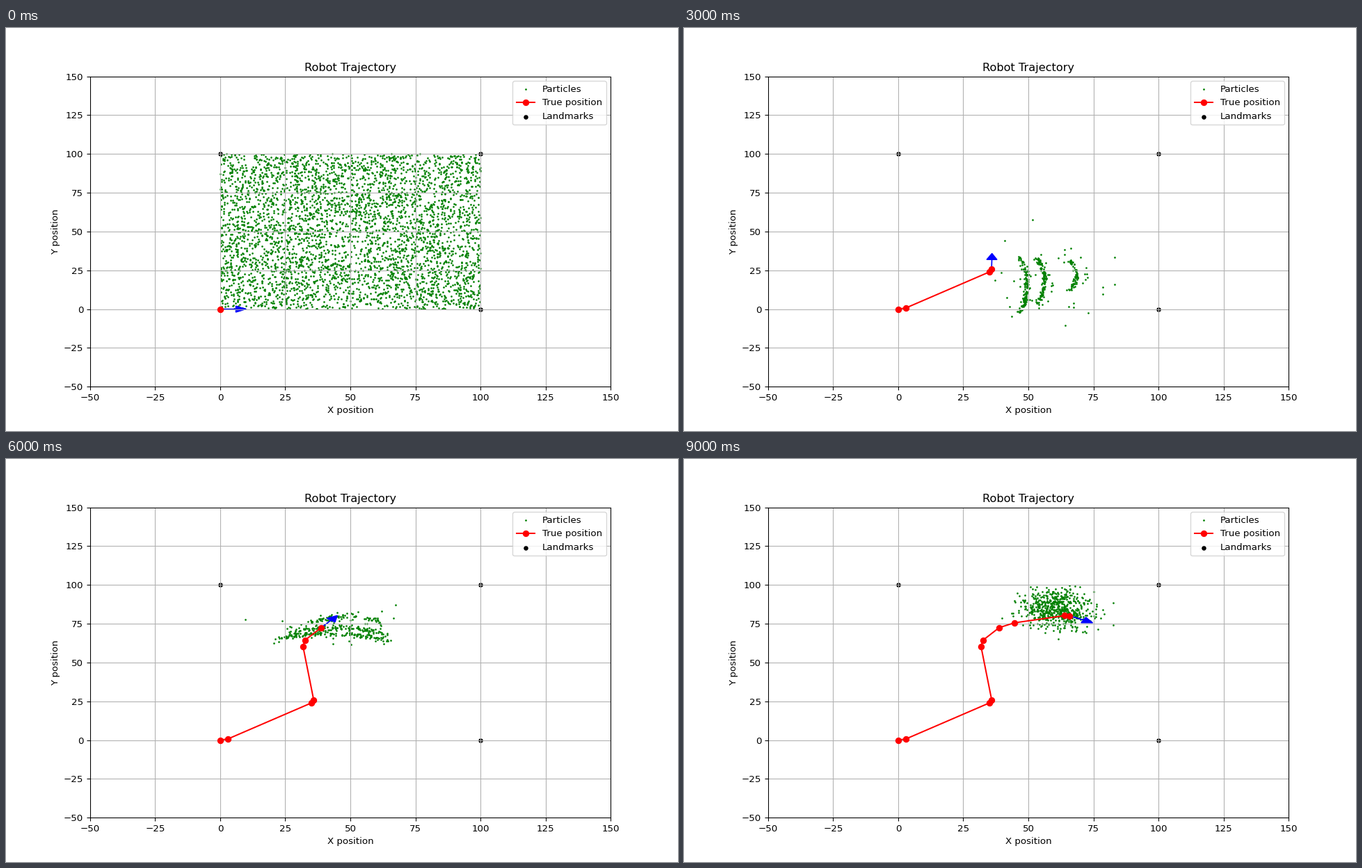
A matplotlib script for the animation above (10000 ms loop, 966 by 580 pixels).

```python
import numpy as np
import matplotlib.pyplot as plt
from matplotlib.animation import FuncAnimation

W, H, DPI = 966, 580, 96.6
rng = np.random.default_rng(7)

# Robot poses and the middle of the particle cloud at each step
PATH = np.array([
    (0, 0), (2.9, 0.7), (35.1, 24.0), (35.9, 25.9), (31.8, 60.4),
    (32.5, 64.3), (38.8, 72.5), (44.7, 75.6), (63.9, 80.2), (65.8, 80.1)])
HEADING = [0, 0.5, 0.78, 1.56, 1.72, 0.93, 0.9, 0.08, 0.4, -0.47]
CENTRE = [(50, 50), (20, 18), (59, 14), (58, 19), (51, 61.5),
          (49, 65), (45.5, 73), (43, 77), (57, 83), (60.5, 84.5)]
LANDMARKS = np.array([(0, 0), (100, 0), (0, 100), (100, 100)])


def fan(centre, half, gap, bend, jitter, upright):
    """Three nested arcs, the inner ones longer and fuller."""
    arcs = []
    for level in (-1, -0.3, 1):
        t = rng.uniform(-1, 1, int(100 - 30 * level))
        along = 3 * level + (half - 4 * level) * t
        out = gap * level + bend * (0.3 - t ** 2)
        arcs.append(np.column_stack((out, along) if upright else (along, out)))
    pts = np.vstack(arcs)
    return centre + pts + rng.normal(0, jitter, pts.shape)


def cloud(step):
    """Particles: uniform, then a blob, then bent ridges, then a blob again."""
    centre = CENTRE[step]
    if step == 0:
        return rng.uniform(0, 100, (4000, 2))
    if step == 1:
        return np.abs(rng.normal(centre, 14, (280, 2)) + 3) - 3
    if step >= 8:
        return rng.normal(centre, 60 / step, (600, 2))
    upright = step < 4
    half, gap, bend = (14, 9.5, 3) if upright else (19, 5.5, 5)
    ridges = fan(centre, half, gap, bend, 0.15 * step, upright)
    strays = rng.normal(centre, (11, 32 / step), (55, 2))
    return np.vstack((ridges, strays))


clouds = [cloud(i) for i in range(len(PATH))]

fig, ax = plt.subplots(figsize=(W / DPI, H / DPI), dpi=DPI)
ax.set(xlim=(-50, 150), ylim=(-50, 150), title="Robot Trajectory",
       xlabel="X position", ylabel="Y position")
ax.grid(True)

dots = ax.scatter([], [], s=1, c="green", label="Particles")
arrow = ax.arrow(0, 0, 6, 0, head_width=4, head_length=4, fc="blue", ec="blue")
trail, = ax.plot([], [], "ro-", label="True position")
ax.scatter(*LANDMARKS.T, s=15, c="black", label="Landmarks")
ax.legend(loc="upper right")


def update(i):
    dots.set_offsets(clouds[i])
    trail.set_data(*PATH[:i + 1].T)
    x, y = PATH[i]
    a = HEADING[i]
    arrow.set_data(x=x, y=y, dx=6 * np.cos(a), dy=6 * np.sin(a))
    return dots, trail, arrow


anim = FuncAnimation(fig, update, frames=len(PATH), interval=1000,
                     init_func=lambda: update(0), repeat=True, repeat_delay=0)
plt.show()
```
